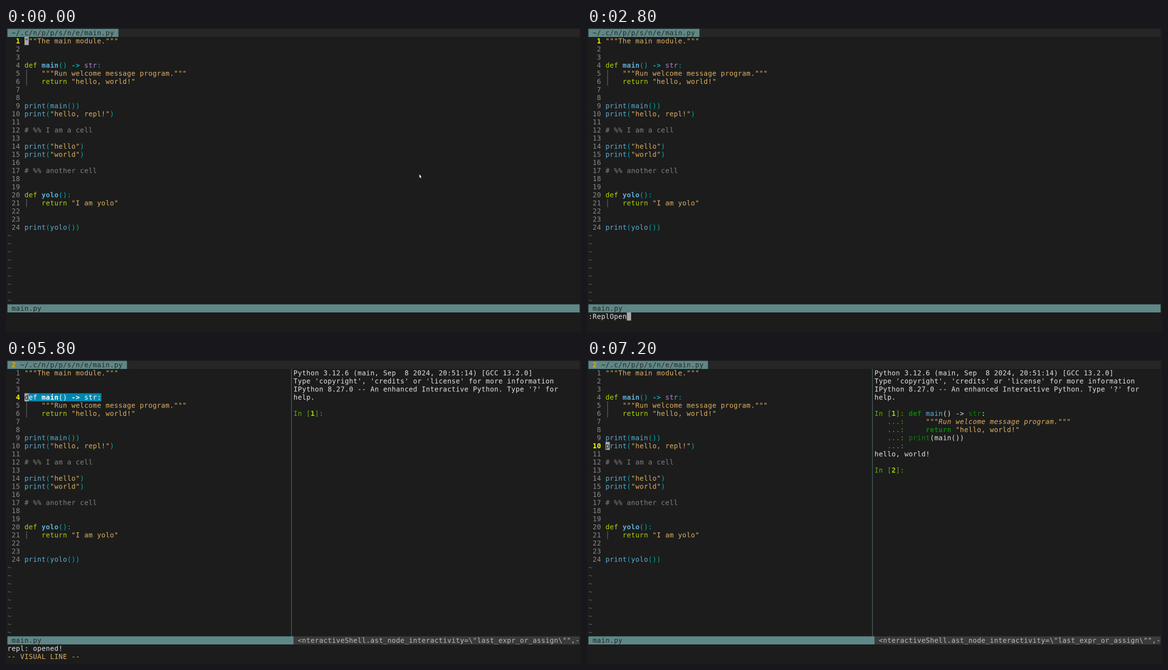
An HTML page with a canvas for the animation above (8 s loop, 1030 by 544 pixels).

```html
<!DOCTYPE html>
<html lang="en">
<head>
<meta charset="utf-8">
<title>Editor with REPL</title>
<style>
html, body { margin: 0; width: 100%; height: 100%; overflow: hidden; background: #1c1c1c; }
canvas { display: block; width: 1030px; height: 544px; }
</style>
</head>
<body>
<canvas width="2060" height="1088"></canvas>
<script>
// The canvas is drawn at double size; all cell measures are in its pixels.
const ctx = document.querySelector('canvas').getContext('2d');
const CELL_W = 15.3, CELL_H = 29, LEFT = 5, TOP = 3, BASELINE = 22.5;
const COLS = 134, SPLIT = 67, STATUS = 34, GUTTER = 4, LOOP = 8000;
const C = {
  bg: '#1c1c1c', bar: '#262626', teal: '#5f8787', dim: '#3a3a3a', cursor: '#a8a8a8',
  text: '#e4e4e4', number: '#8a8a8a', current: '#ffff00', tilde: '#626262', comment: '#808080',
  string: '#dfb163', keyword: '#afd700', name: '#5fafd7', punct: '#00afaf', type: '#af87d7',
  select: '#0087af', prompt: '#5faf00', green: '#008700', gold: '#dfaf00'
};

const source = `"""The main module."""


def main() -> str:
    """Run welcome message program."""
    return "hello, world!"


print(main())
print("hello, repl!")

# %% I am a cell

print("hello")
print("world")

# %% another cell


def yolo():
    return "I am yolo"


print(yolo())`.split('\n');

const typing = [[0, 0], [1300, 1], [1600, 2], [1700, 3], [1800, 4], [2000, 5], [2500, 6], [2600, 7], [2800, 9]];
const moves = [[0, 1], [5100, 2], [5200, 3], [5400, 4], [5900, 5], [6100, 7], [6400, 8], [6600, 9], [7200, 10]];
const valueAt = (steps, t) => steps.findLast(([start]) => start <= t)[1];

const x = col => LEFT + col * CELL_W;
const y = row => TOP + row * CELL_H;

function box(row, col, cols, color, rows = 1) {
  ctx.fillStyle = color;
  ctx.fillRect(x(col), y(row), cols * CELL_W, rows * CELL_H);
}

function put(row, col, text, color = C.text, style = '') {
  ctx.font = `${style} 24.2px "DejaVu Sans Mono", monospace`;
  ctx.fillStyle = color;
  [...text].forEach((ch, i) => ch !== ' ' && ctx.fillText(ch, x(col + i), y(row) + BASELINE));
  return col + text.length;
}

// Each part is [text, color, style].
function putAll(row, col, ...parts) {
  for (const part of parts) col = put(row, col, ...part);
}

function vline(row, col, rows, color) {
  ctx.fillStyle = color;
  ctx.fillRect(x(col + 0.5) - 0.8, y(row), 1.6, rows * CELL_H);
}

function highlight(line) {
  let afterDef = false;
  return line.match(/#.*|"+[^"]*"+|->|\w+|\s+|./g)?.map(token => {
    if (token[0] === '#') return [token, C.comment];
    if (token[0] === '"') return [token, C.string];
    if (token === '->') return [token, C.punct, 'bold'];
    if (token === 'str') return [token, C.type];
    if (/def|return/.test(token)) {
      afterDef = token === 'def';
      return [token, C.keyword];
    }
    if (!/\w/.test(token)) return [token, C.punct];
    return [token, C.name, afterDef ? 'bold' : ''];
  }) ?? [];
}
const highlighted = source.map(highlight);

function drawCursor(row, col, ch = '') {
  box(row, col, 1, C.cursor);
  put(row, col, ch, C.bg);
}

function drawEditor(current, visual, focused) {
  source.forEach((line, i) => {
    const row = i + 1, active = row === current;
    const selected = visual && row >= 4 && row <= current;
    put(row, 0, String(row).padStart(3), active ? C.current : C.number, active ? 'bold' : '');
    if (selected) box(row, GUTTER, line.length || 1, C.select);
    if (active && focused) drawCursor(row, GUTTER, line[0]);
    if (line[0] === ' ') vline(row, GUTTER, 1, selected ? '#3a7890' : C.comment);
    let col = GUTTER;
    for (const [text, color, style] of highlighted[i]) {
      const hidden = active && focused && col === GUTTER ? 1 : 0;
      put(row, col + hidden, text.slice(hidden), selected ? '#ffffff' : color, style);
      col += text.length;
    }
  });
  for (let row = source.length + 1; row < STATUS; row++) put(row, 0, '~', C.tilde);
}

function drawPrompt(row, n) {
  putAll(row, SPLIT, ['In [', C.prompt], [String(n), C.keyword, 'bold'], [']:', C.prompt]);
}

function drawRepl(executed) {
  [
    'Python 3.12.6 (main, Sep  8 2024, 20:51:14) [GCC 13.2.0]',
    "Type 'copyright', 'credits' or 'license' for more information",
    "IPython 8.27.0 -- An enhanced Interactive Python. Type '?' for",
    'help.'
  ].forEach((line, i) => put(i + 1, SPLIT, line));
  drawPrompt(6, 1);
  if (!executed) return;
  const code = SPLIT + 8;
  for (let row = 7; row <= 10; row++) put(row, SPLIT, '   ...:', C.prompt);
  putAll(6, code, ['def', C.green, 'bold'], [' main', C.name], ['() -> '], ['str', C.green], [':']);
  put(7, code + 4, '"""Run welcome message program."""', C.string, 'italic');
  putAll(8, code + 4, ['return', C.green, 'bold'], [' "hello, world!"', C.string]);
  putAll(9, code, ['print', C.green], ['(main())']);
  put(11, SPLIT, 'hello, world!');
  drawPrompt(13, 2);
}

function drawBars(split) {
  box(0, 0, COLS, C.bar);
  box(0, 0, split ? 28 : 26, C.teal);
  if (split) put(0, 1, '2', C.gold, 'bold');
  put(0, split ? 3 : 1, '~/.c/n/p/p/s/n/e/main.py', C.bar);
  box(STATUS, 0, split ? SPLIT : COLS, C.teal);
  put(STATUS, 1, 'main.py', C.bar);
  if (!split) return;
  box(STATUS, SPLIT, SPLIT, C.dim);
  put(STATUS, SPLIT + 1, '<nteractiveShell.ast_node_interactivity=\\"last_expr_or_assign\\"",-', '#bcbcbc');
  vline(1, SPLIT - 1, STATUS - 1, C.teal);
}

function drawPointer() {
  const arrow = new Path2D('M1481 523v13l3-2 2 4 2-1-2-4h3z');
  ctx.strokeStyle = '#000';
  ctx.lineWidth = 2;
  ctx.stroke(arrow);
  ctx.fillStyle = '#fff';
  ctx.fill(arrow);
}

function draw(t) {
  const split = t >= 3200, executed = t >= 7200;
  const visual = t >= 5800 && !executed;
  const typed = split ? 0 : valueAt(typing, t);
  ctx.fillStyle = C.bg;
  ctx.fillRect(0, 0, 2060, 1088);
  drawBars(split);
  drawEditor(valueAt(moves, t), visual, !typed);
  if (t >= 3600) drawRepl(executed);
  if (typed) {
    put(STATUS + 1, 0, ':ReplOpen'.slice(0, typed));
    drawCursor(STATUS + 1, typed);
  }
  if (split && !executed) put(STATUS + 1, 0, 'repl: opened!');
  if (visual) put(STATUS + 2, 0, '-- VISUAL LINE --', C.string);
  if (t < 2800) drawPointer();
}

function tick() {
  draw(performance.now() % LOOP);
  requestAnimationFrame(tick);
}
tick();
</script>
</body>
</html>
```
